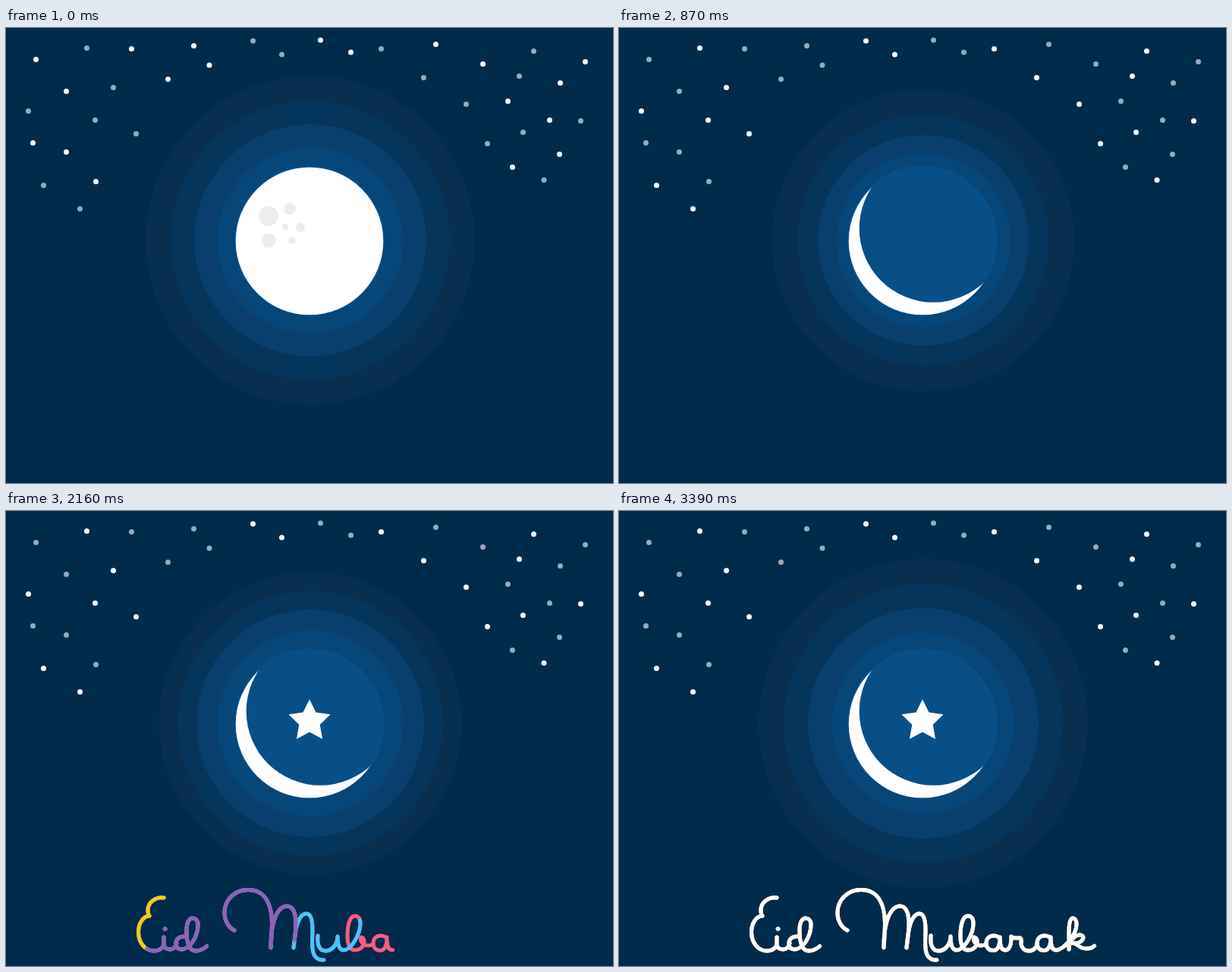
These frames come from a looping animation (800 by 600 pixels, 3.69 s). An HTML page:

```html
<!DOCTYPE html>
<html lang="en">
<head>
<meta charset="utf-8">
<title>Eid Mubarak</title>
<style>
  html, body { margin: 0; width: 100%; height: 100%; overflow: hidden; background: #002b4b; }
  svg { display: block; width: 100vw; height: 100vh; }
  .sky path { fill: none; stroke: #fff; stroke-width: 7; stroke-linecap: round; }
  .pen path { fill: none; stroke-width: 5; stroke-linecap: round; stroke-linejoin: round; }
</style>
</head>
<body>
<svg viewBox="0 0 800 600" role="img" aria-label="Eid Mubarak">
  <defs>
    <mask id="shade" maskUnits="userSpaceOnUse" x="290" y="170" width="220" height="220">
      <rect x="290" y="170" width="220" height="220" fill="#fff"/>
      <circle id="shadow" r="97.6"/>
    </mask>
  </defs>
  <g id="rings"></g>
  <circle cx="400" cy="280.5" r="99" fill="#094f87"/>
  <g class="sky" transform="translate(.5 .5)">
    <path id="starsA" d="M39 41h0M165 27h0M247 23h0M267.5 48.5h0M213 67h0M79 83h0M35 151h0M79 163h0M118 202h0M414 15.5h0M454 31.5h0M566 21h0M628 47h0M763 44h0M730 72h0M661 96h0M716 121h0M729 166h0M667 183h0"/>
    <path id="starsB" d="M106 26h0M141 78h0M29 109h0M117 121h0M171 139h0M49 207h0M97 238h0M325 16.5h0M363 34.5h0M494 27h0M550 65h0M606 100h0M634 152h0M676 63h0M695 30h0M681 137h0M757 122h0M708.5 200h0"/>
  </g>
  <g mask="url(#shade)">
    <circle cx="400" cy="281" r="97.3" fill="#fff"/>
    <g fill="#ededed">
      <circle cx="346" cy="248" r="13"/>
      <circle cx="374" cy="238.5" r="8"/>
      <circle cx="368" cy="262.3" r="4.2"/>
      <circle cx="388" cy="263" r="6"/>
      <circle cx="346.5" cy="280" r="9.6"/>
      <circle cx="376.5" cy="280" r="4.8"/>
    </g>
  </g>
  <polygon id="star" fill="#fff"/>
  <g id="pen" class="pen"></g>
</svg>
<script>
const LOOP = 3690, STEP = 30, LAST = 3390;
const $ = id => document.getElementById(id);

function add(parent, tag, attrs) {
  const el = document.createElementNS('http://www.w3.org/2000/svg', tag);
  for (const k in attrs) el.setAttribute(k, attrs[k]);
  return parent.appendChild(el);
}

// Eased progress from 0 to 1 between two times
function ease(t, from, to) {
  const x = Math.min(1, Math.max(0, (t - from) / (to - from)));
  return x * x * (3 - 2 * x);
}

const rings = [[217, '#082f50'], [184, '#05355a'], [153, '#083f6d'], [123, '#074679']]
  .map(([r, fill]) => ({ r, el: add($('rings'), 'circle', { cx: 401, cy: 280, fill }) }));

$('star').setAttribute('points', Array.from({ length: 10 }, (_, i) => {
  const a = i * Math.PI / 5, r = i % 2 ? 14.4 : 29;
  return (r * Math.sin(a)).toFixed(2) + ',' + (-r * Math.cos(a)).toFixed(2);
}).join(' '));

// Handwriting, in the order the pen follows
const letterA = 'c0-6 4-10 10-10 4 0 7 2 8 5-1-3-4-5-8-5-6 0-10 4-10 10 0 6 4 9.5 9 9.5 6 0 9-6 9-17.5 0 10 1 17 7 17';
const strokes = [
  // E, i
  'M208 510C198 508 187 516 187 526C187 530 188 533 189 534C181 534 174.5 544 174.5 555' +
  'C174.5 569 183 580 195 580C202 580 208 576 208 570L208 562L208 571C208 576 212 578 216 578C221 578 224 574 225 570',
  'M209.2 551h.8',
  // d
  'M235 561C228 561 224 565 224 570C224 575 226 578 231 578C243 578 253 561 253 545' +
  'C253 540 250 537 246 537C241 537 238 543 238 553C238 570 242 580 250 580C256 580 260 578 264.5 574',
  // M
  'M301 553C293 549 288 540 288 530C288 512 302 499.5 319 499.5C340 499.5 350 516 350.5 543' +
  'C350.5 556 349.5 566 349 576C349 566 350 553 352 545C355 531 362 521 370 521' +
  'C379 521 382 532 382 545C382 556 380 567 379 576C380 566 381 556 383 548' +
  'C386 537 390 531 396 531C402 531 404 540 404 553C404 562 403 570 404 577C405 587 410 593 419 592',
  // u, b
  'M411 560C410 570 412 580 421 580C431 580 437 570 437 561C437 570 438 579 445 579' +
  'C455 579 467 558 467 544C467 537 464 534 460 534C453 534 450 546 450 560' +
  'C450 572 453 579 460 579C467 579 472 574 472 568C472 564 470 562 468 562C466 566 470 573 477 573C481 573 483 572 484 570',
  // a, r
  'M484 570' + letterA + 'C515 579 517 570 517 561C519 564 524 563 528 563C531 563 530 568 530 571C531 577 535 580 540 580C546 580 551 576 551 570',
  // a, k
  'M551 570' + letterA + 'C585 579 603 560 603 545C603 540 601 537 598 537C594 537 593 546 593 556L593 578' +
  'C593 568 600 559 607 559C611 559 613 562 611 565C609 569 603 570 599 570C604 570 606 577 616 577C621 577 624 576 626.5 573.5'
];

const inks = [
  ['#ff5b80', 1682, 2392],
  ['#47c5fd', 1838, 2410],
  ['#8f62b8', 1888, 2502],
  ['#f8ca17', 2070, 2670],
  ['#ffffff', 2267, 2850]
].map(([stroke, from, to]) => ({
  from, to, parts: strokes.map(d => add($('pen'), 'path', { d, stroke }))
}));
const lengths = inks[0].parts.map(p => p.getTotalLength());
const total = lengths.reduce((a, b) => a + b);

function write({ from, to, parts }, t) {
  let left = total * ease(t, from, to);
  parts.forEach((p, i) => {
    const len = lengths[i];
    p.style.visibility = left > 0 ? 'visible' : 'hidden';
    p.style.strokeDasharray = left >= len ? 'none' : Math.max(0, left) + ' ' + 2 * len;
    left -= len;
  });
}

function ringScale(t) {
  return 1 - 0.1 * (ease(t, 0, 685) - ease(t, 685, 1370) + ease(t, 1665, 2350) - ease(t, 2350, 3230));
}

function draw(t) {
  rings.forEach(({ r, el }, i) => el.setAttribute('r', r * ringScale(t - 150 * i)));

  const twinkle = 0.4 * ease(t, 0, 690);
  $('starsA').style.opacity = 1 - twinkle;
  $('starsB').style.opacity = 0.6 + twinkle;

  const away = (1 - ease(t, 0, 830)) ** 2;
  $('shadow').setAttribute('cx', 414.3 + 89 * away);
  $('shadow').setAttribute('cy', 264.2 - 157 * away);

  $('star').setAttribute('transform', `translate(400 277.2) scale(${ease(t, 900, 1300)})`);
  inks.forEach(ink => write(ink, t));
}

const start = performance.now();
function tick() {
  const t = (performance.now() - start) % LOOP;
  draw(t < 120 ? 0 : Math.min(LAST, Math.floor(t / STEP) * STEP));
  requestAnimationFrame(tick);
}
tick();
</script>
</body>
</html>
```
